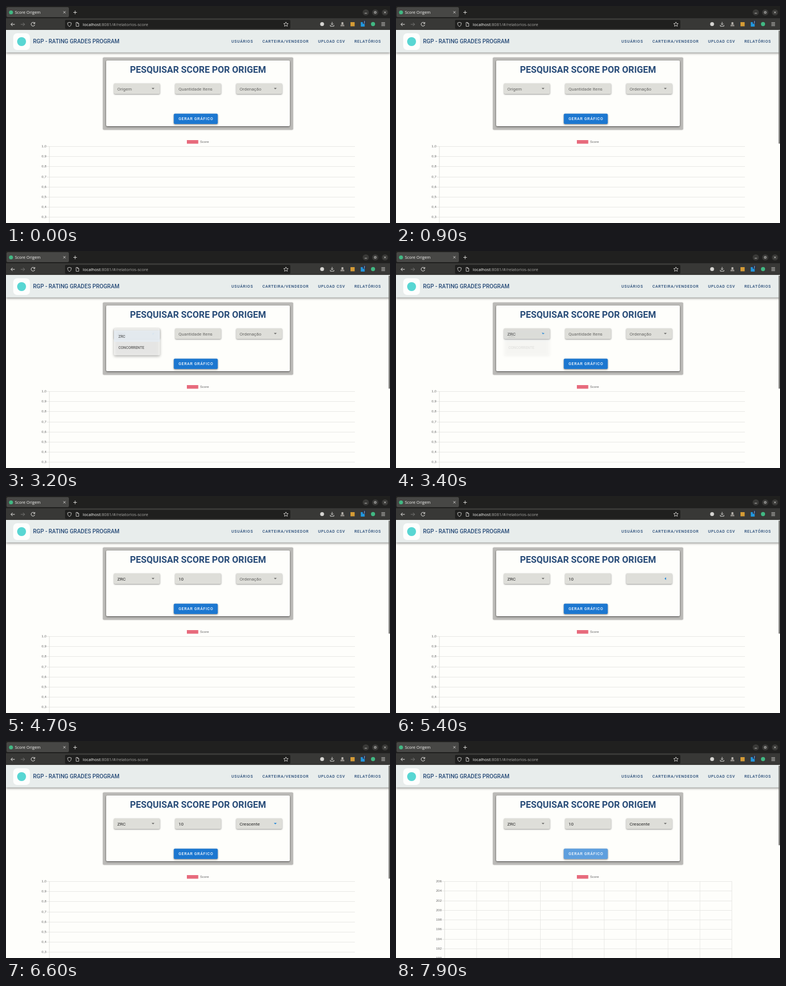
Animation, 690 px wide and 390 px high, one loop 8 s. Source, as an HTML page with a canvas:

```html
<!DOCTYPE html>
<html lang="pt-BR">
<head>
<meta charset="utf-8">
<title>Score Origem</title>
<style>
html, body { margin: 0; width: 100%; height: 100%; overflow: hidden; background: #fefefb; }
canvas { display: block; }
</style>
</head>
<body>
<canvas id="stage" width="690" height="390"></canvas>
<script>
const ctx = document.getElementById('stage').getContext('2d');
const LOOP = 8000, TICK = 100;
const NAVY = '#274b78', PAGE = '#fefefb', BLUE = [25, 130, 215], GREY = [105, 105, 103];
const UI = '"Open Sans", sans-serif', ROBOTO = 'Roboto, sans-serif', ARIAL = '"Liberation Sans", Arial, sans-serif';

const clamp = v => Math.max(0, Math.min(1, v));
const ramp = (t, start, length) => clamp((t - start) / length);
const ease = p => 1 - (1 - p) ** 3;
const mix = (a, b, p) => `rgb(${a.map((v, i) => Math.round(v + (b[i] - v) * p))})`;

function box(x, y, w, h, color, r = 0) {
  ctx.fillStyle = color;
  ctx.beginPath();
  ctx.roundRect(x, y, w, h, r);
  ctx.fill();
}

function raised(x, y, w, h, color, r, blur, dy, alpha) {
  ctx.save();
  ctx.shadowColor = `rgba(0,0,0,${alpha})`;
  ctx.shadowBlur = blur;
  ctx.shadowOffsetY = dy;
  box(x, y, w, h, color, r);
  ctx.restore();
}

function disc(x, y, r, color) {
  ctx.fillStyle = color;
  ctx.beginPath();
  ctx.arc(x, y, r, 0, Math.PI * 2);
  ctx.fill();
}

function label(str, x, y, font, color, align = 'left', spacing = 0) {
  ctx.font = font;
  ctx.fillStyle = color;
  ctx.textAlign = align;
  ctx.letterSpacing = spacing + 'px';
  ctx.fillText(str, x, y);
  ctx.letterSpacing = '0px';
}

function stroke(d, color, width = 1) {
  ctx.strokeStyle = color;
  ctx.lineWidth = width;
  ctx.stroke(new Path2D(d));
}

function browser() {
  const ink = '#e6e5e2';
  box(0, 0, 690, 23, '#20201f');
  box(1, 2, 112, 18, '#474745', 2.5);
  disc(9, 11.5, 3.6, '#41b883');
  label('Score Origem', 16, 14.2, '7.3px ' + UI, '#f5f5f2');
  stroke('M103 9.3l4 4m0-4l-4 4', ink, 0.8);
  stroke('M121 11.5h6.4m-3.2-3.2v6.4', ink, 0.9);

  for (const x of [646.5, 663.5, 681]) disc(x, 11.5, 5.6, '#393937');
  stroke('M644.5 13h4M662 10h3v3h-3zM679.3 9.8l3.4 3.4m0-3.4l-3.4 3.4', ink, 0.8);

  box(0, 22, 690, 21, '#383836');
  box(106, 25, 405, 16, '#1f1f1e', 2);
  stroke('M15.8 33h-7m3-3l-3 3l3 3', ink);
  stroke('M26.5 33h7m-3-3l3 3l-3 3', '#777775');
  stroke('M51.2 30.6a3.4 3.4 0 1 0 .6 3.2M51.8 29v2.7h-2.7', ink);
  stroke('M114 29.3l3.3 1.1c0 3.2-.7 5.2-3.3 6.6c-2.6-1.4-3.3-3.4-3.3-6.6z', ink, 0.8);
  stroke('M126 29.5h2.8l2 2v5h-4.8zM128.6 29.5v2.2h2.2', ink, 0.8);
  stroke('M503 28.8l1.2 2.6l2.9.3l-2.2 1.9l.7 2.9l-2.6-1.5l-2.6 1.5l.7-2.9l-2.2-1.9l2.9-.3z', ink, 0.8);

  label('localhost', 138, 35.6, '7.64px ' + UI, '#fbfbf8');
  const hostWidth = ctx.measureText('localhost').width;
  label(':8081/#/relatorios-score', 138 + hostWidth, 35.6, '7.64px ' + UI, '#aaa9a6');

  disc(568, 32.5, 3.5, '#d5d4d1');
  stroke('M586 28.7v5m-2.2-2.2l2.2 2.2l2.2-2.2M582.8 34v2.3h6.4v-2.3', ink, 0.9);
  disc(604.5, 31, 2, '#bcb8b2');
  box(601, 33, 7, 3.6, '#8d8984', [2, 2, 0, 0]);
  box(619, 29, 7.5, 7.5, '#d59b35');
  box(637.5, 29, 7, 8, '#2297df');
  box(641, 26, 6, 6, '#20304c', 1);
  label('2', 644, 31, '5px ' + UI, '#ffffff', 'center');
  disc(659.5, 32.5, 3.7, '#41b883');
  stroke('M674.5 30h6.6m-6.6 2.6h6.6m-6.6 2.6h6.6', ink, 0.9);
}

function header() {
  raised(0, 43, 690, 40.5, '#e8edec', 0, 4, 1.5, 0.45);
  box(13, 49, 30, 30, '#fdfefd', 7);
  disc(28, 64, 8, '#58d6d3');
  label('RGP - RATING GRADES PROGRAM', 48.5, 67, '500 10.1px ' + ROBOTO, NAVY);
  const links = [['USUÁRIOS', 405], ['CARTEIRA/VENDEDOR', 460.7], ['UPLOAD CSV', 560.7], ['RELATÓRIOS', 626]];
  for (const [name, x] of links) label(name, x, 66.2, '500 7.07px ' + ROBOTO, NAVY, 'left', 0.68);
}

function field(x, str, filled) {
  raised(x, 139, 82.5, 19, '#deded9', 2, 2.5, 1, 0.42);
  label(str, x + 6, 151.8, '8.08px ' + ROBOTO, filled ? '#242424' : '#666663');
}

function arrow(x, turn, color) {
  ctx.save();
  ctx.translate(x, 148.5);
  ctx.rotate(turn * Math.PI);
  ctx.fillStyle = color;
  ctx.fill(new Path2D('M-2.6-1.3h5.2l-2.6 2.6z'));
  ctx.restore();
}

function select(s, t) {
  const picked = t >= s.close;
  const open = ease(ramp(t, s.menu, 200));
  const fade = 1 - ramp(t, s.close, 330);
  const focus = t < s.focus ? 0 : 1 - ramp(t, s.blur - 100, s.blurLength);
  const turn = ramp(t, s.focus, 400) * fade;
  field(s.x, picked ? s.options[0] : t < s.focus ? s.label : '', picked);
  arrow(s.x + 70.2, turn, mix(GREY, BLUE, focus));
  s.menuAlpha = open * fade;
  s.menuScale = open;
}

function menu(s, t) {
  if (s.menuAlpha <= 0) return;
  ctx.save();
  ctx.globalAlpha = s.menuAlpha;
  ctx.translate(s.x, 139);
  ctx.scale(s.menuScale, s.menuScale);
  raised(0, 0, 82.5, 48.3, '#fefefd', 2, 5, 2, 0.45);
  box(0, 4, 82.5, 20.2, t >= s.close ? '#e5eef6' : '#f4f4f1');
  s.options.forEach((name, i) => {
    label(name, 8, 16.5 + i * 20.2, '500 6.56px ' + ROBOTO, '#222222');
  });
  ctx.restore();
}

const selects = [
  { x: 194, label: 'Origem', options: ['ZRC', 'CONCORRENTE'],
    focus: 2200, menu: 2200, close: 3100, blur: 3700, blurLength: 500 },
  { x: 413.7, label: 'Ordenação', options: ['Crescente', 'Decrescente'],
    focus: 5200, menu: 5400, close: 6250, blur: 7600, blurLength: 400 },
];

function button(t) {
  const ripple = ramp(t, 7500, 400);
  raised(301.5, 193.5, 79, 18.5, '#1c77d0', 2, 3, 1.2, 0.45);
  ctx.save();
  ctx.beginPath();
  ctx.roundRect(301.5, 193.5, 79, 18.5, 2);
  ctx.clip();
  if (t >= 7200) box(301, 193, 80, 20, 'rgba(255,255,255,.05)');
  if (ripple > 0) disc(341, 203, 45 * ripple, 'rgba(255,255,255,.25)');
  ctx.restore();
  label('GERAR GRÁFICO', 310, 205.3, '500 7.07px ' + ROBOTO, '#f5f9fd', 'left', 0.7);
}

function form(t) {
  raised(174, 92.5, 342, 130, '#bbbab7', 2, 2, 0, 0.25);
  raised(180, 98, 330, 118, PAGE, 2, 3, 1, 0.6);
  label('PESQUISAR SCORE POR ORIGEM', 345, 120, '700 16.3px ' + ROBOTO, NAVY, 'center');
  selects.forEach(s => select(s, t));
  const typed = t >= 4400;
  field(304, typed ? '10' : t < 3700 ? 'Quantidade Itens' : '', typed);
  button(t);
  selects.forEach(s => menu(s, t));
}

function chart(loaded) {
  const left = loaded ? 87.5 : 78, right = loaded ? 603.5 : 627;
  const step = loaded ? 17.25 : 18.17;
  const line = '#e4e4e1', font = '6.06px ' + ARIAL;
  box(325, 241, 20.5, 6.5, '#e76b7c');
  label('Score', 348.8, 246.2, font, '#666666');
  for (let i = 0; i < 9; i++) {
    const y = Math.round(252 + i * step) + 0.5;
    const value = loaded ? String(206 - 2 * i) : (1 - i / 10).toFixed(1).replace('.', ',');
    stroke(`M${left - 5} ${y}H${right}`, line, 0.8);
    label(value, left - 5.5, y + 1.8, font, '#666666', 'right');
  }
  const columns = loaded ? 9 : 0;
  for (let i = 0; i <= columns; i++) {
    const x = left + i * (516 / 9);
    stroke(`M${x} 252V390`, i ? line : '#d8d8d5', 0.8);
  }
}

function draw(t) {
  const loaded = t >= 7800;
  box(0, 0, 690, 390, PAGE);
  header();
  browser();
  form(t);
  chart(loaded);
  const shown = ramp(t, 300, 600);
  if (shown) box(687.5, 44, 2.5, loaded ? 143.5 : 203.5, `rgba(90,90,88,${0.8 * shown})`, 1);
}

function frame(now) {
  draw(Math.floor((now % LOOP) / TICK) * TICK);
  requestAnimationFrame(frame);
}
requestAnimationFrame(frame);
</script>
</body>
</html>
```
